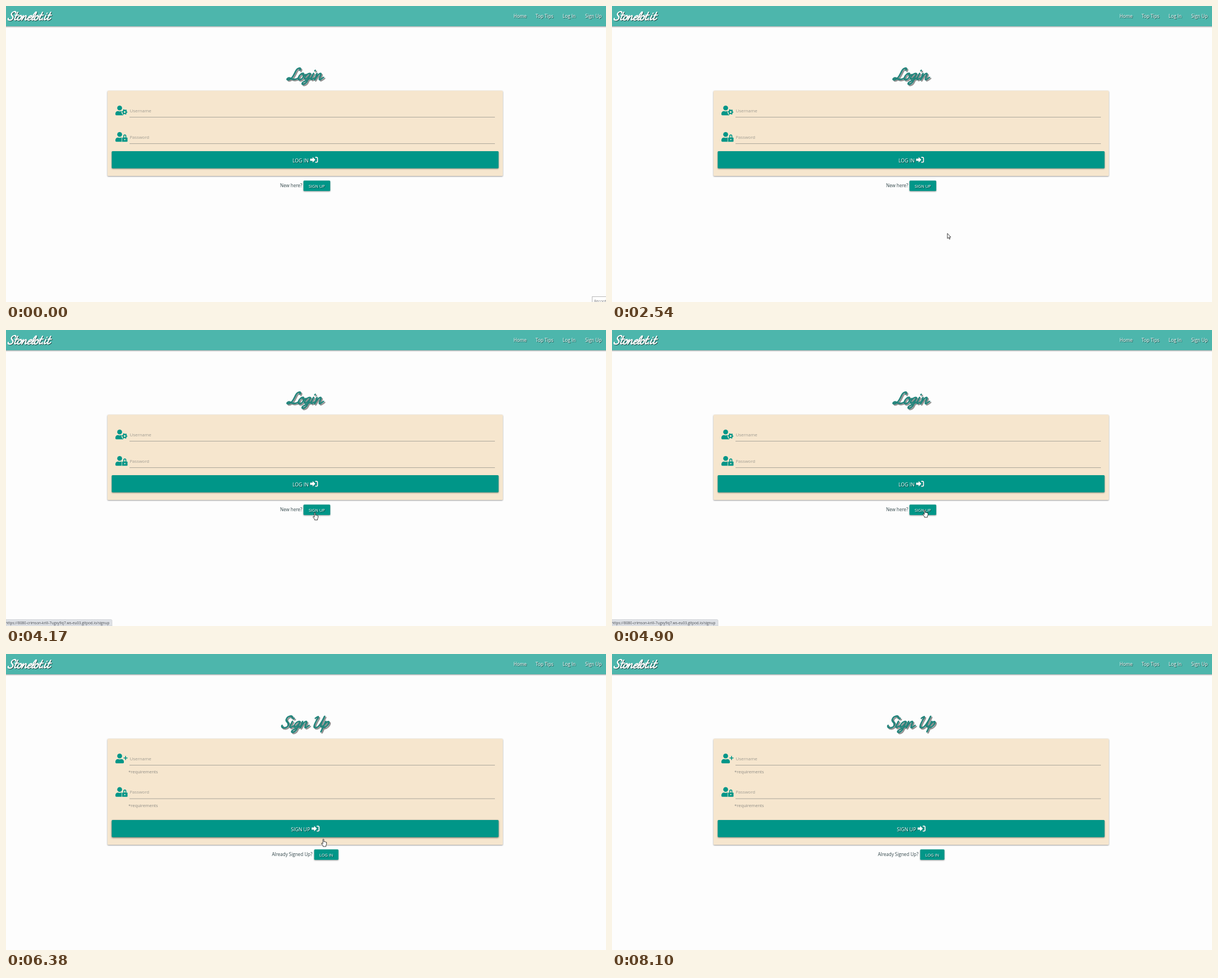
Write an HTML page that moves like this. It is 1064x526 px and loops after 8500 ms.

```html
<!DOCTYPE html>
<html lang="en">
<head>
<meta charset="utf-8">
<title>Login and sign up</title>
<style>
html, body { margin: 0; width: 100%; height: 100%; overflow: hidden; background: #fdfdfd; }
svg { display: block; font-family: "Open Sans", "Noto Sans", sans-serif; }
.teal { fill: #009688; }
.script { fill: none; stroke-linecap: round; stroke-linejoin: round; }
.lift { filter: drop-shadow(0 1px 1px rgba(0,0,0,.4)); }
.hover { filter: drop-shadow(0 1.5px 1.5px rgba(0,0,0,.55)); }
.glow { filter: drop-shadow(1px 1px .6px rgba(0,0,0,.6)); }
</style>
</head>
<body>
<svg id="stage" width="1064" height="526" viewBox="0 0 1064 526">
  <defs>
    <g id="user">
      <circle cx="224" cy="128" r="128"/>
      <path d="M314 288h-17c-46 21-100 21-146 0h-17C60 288 0 348 0 422v42c0 26 22 48 48 48h352c27 0 48-22 48-48v-42c0-74-60-134-134-134z"/>
    </g>
    <g id="cog">
      <circle cx="488" cy="336" r="172" fill="#f6e6ce"/>
      <circle cx="488" cy="336" r="124" fill="none" stroke="#009688" stroke-width="46" stroke-dasharray="65" stroke-dashoffset="32"/>
      <circle cx="488" cy="336" r="81" fill="none" stroke="#009688" stroke-width="66"/>
    </g>
    <g id="lock">
      <path d="M368 288v-80a128 128 0 0 1 256 0v80h40v224H328V288z" fill="#f6e6ce"/>
      <path d="M440 300v-92a56 56 0 0 1 112 0v92" fill="none" stroke="#009688" stroke-width="48"/>
      <rect x="352" y="288" width="288" height="224" rx="32"/>
      <circle cx="496" cy="400" r="34" fill="#f6e6ce"/>
    </g>
    <path id="plus" d="M512 128h48v80h80v48h-80v80h-48v-80h-80v-48h80z"/>
    <g id="enter" fill="#fff">
      <path d="M0 180h160V72l180 184-180 184V332H0z"/>
      <path d="M330 98h86q64 0 64 64v188q0 64-64 64h-86" fill="none" stroke="#fff" stroke-width="64"/>
    </g>
  </defs>
  <g id="login"></g>
  <g id="signup"></g>
  <g id="header"></g>
  <g id="status">
    <path d="M0 514.5H186q2 0 2 2V526H0z" fill="#dee1e6" stroke="#c4c7cc" stroke-width=".6"/>
    <text x="-1" y="522.7" font-size="6.45" fill="#4a4d52">https://8080-crimson-krill-7ugxy9q7.ws-eu03.gitpod.io/signup</text>
  </g>
  <g id="tip">
    <rect x="1039.5" y="516.5" width="30" height="15" fill="#fff" stroke="#b9b9b9"/>
    <text id="tipText" x="1043" y="527" font-size="6.6" fill="#777">Record</text>
  </g>
  <g id="cursor" fill="#fff" stroke="#111" stroke-width=".8" stroke-linejoin="round">
    <path id="arrow" d="M0 0V9L2 7.2 3.4 10.3 4.8 9.7 3.4 6.7H6.1z"/>
    <path id="hand" d="M-.9.8Q0-.6.9.8V5l1.3-.4.5.6 1.2-.2.5.7 1.2.1V9.4L4.6 11.6V13.4H-.6V12L-3.4 8.2Q-3.2 6.7-2 7.3L-.9 8.5z"/>
  </g>
</svg>
<script>
const $ = id => document.getElementById(id);

// Brush letters: advance width and pen path, baseline at 0
const glyphs = {
  L: [17, "M15-17C16-22 9-22 8-15C7-8 6-1 1 0C-4 0-3-4 1-3C6-2 10 2 17-3"],
  S: [15, "M14-17C13-23 4-21 4-15C4-10 12-10 11-4C10 2 0 1 0-4"],
  U: [18, "M0-17C3-20 5-21 4-16C2-8 1 0 6 0C11 0 14-10 15-20C13-8 12 1 18-3"],
  o: [11, "M6-11C2-12 0-8 0-4C0 2 8 1 8-5C8-9 6-11 4-10M8-7 11-9"],
  g: [12, "M8-10C4-13 0-8 0-4C0 1 6-1 8-10L6 4C5 9-1 9-1 6C-1 3 7 1 12-4"],
  i: [7, "M1-11 0-3C0 1 4-1 7-4M2-16v-.5"],
  n: [14, "M0-11V0C1-6 4-11 6-11C9-11 7-3 8-1C9 1 12-2 14-4"],
  p: [13, "M2-11 0 7M1-4C3-10 6-12 8-10C10-6 6 1 1-1"],
  t: [8, "M3-19 1-4C1 1 5 0 8-4M-1-12H7"],
  e: [9, "M1-5C10-7 7-13 3-10C-2-6 0 1 4 0C6 0 8-2 9-4"],
  l: [7, "M3-6C8-14 7-22 4-19C0-12 0 0 3 0C5 0 6-2 7-4"],
  ".": [5, "M1-1v.5"],
  " ": [7, ""]
};

function script(word, x, y, scale, color, shadow) {
  let pen = 0;
  const paths = [...word].map(c => {
    const [width, d] = glyphs[c];
    const path = `<path transform="translate(${pen})" d="${d}"/>`;
    pen += width;
    return path;
  }).join("");
  return `<g role="img" aria-label="${word}" style="filter:drop-shadow(${shadow})">
    <g class="script" stroke="${color}" stroke-width="3" transform="translate(${x} ${y}) scale(${scale}) skewX(-19)">${paths}</g></g>`;
}

const text = (s, x, y, size, fill, cls = "") =>
  `<text class="${cls}" x="${x}" y="${y}" font-size="${size}" fill="${fill}">${s}</text>`;

const icon = (id, x, y, scale, cls = "teal") =>
  `<use class="${cls}" href="#${id}" transform="translate(${x} ${y}) scale(${scale})"/>`;

const rect = (x, y, w, h, fill, id = "") =>
  `<rect id="${id}" class="lift" x="${x}" y="${y}" width="${w}" height="${h}" rx="1.5" fill="${fill}"/>`;

const field = (label, badge, y, size) =>
  icon("user", 194, y, .0336) + icon(badge, 194, y, .0336) +
  text(label, 219.5, y + 11.8, size, "#a09c92") +
  `<path d="M219 ${y + 20.6}H867" stroke="#aaa59a"/>`;

function page(p) {
  const b = p.button;
  return script(p.title, p.titleX, 131, 1, "#24857c", "2px 2px .7px rgba(0,0,0,.42)") +
    rect(180, 150.5, 701, b - 107 + .5, "#f6e6ce") +
    field("Username", p.badge, 177, 7.9) +
    field("Password", "lock", p.second, 7.65) +
    p.notes.map(y => text("*requirements", 217, y, 7.65, "#8f8c85")).join("") +
    rect(187.5, b, 686, 30.5, "#009688", p.id) +
    text(p.action, p.actionX, b + 20.4, 8.7, "#fff", "glow") +
    icon("enter", p.enterX, b + 8.3, .0273, "glow") +
    text(p.ask, p.askX, b + 63.6, 8.05, "#34484c") +
    rect(p.linkX, b + 52.3, p.linkW, 18.5, "#009688") +
    text(p.link, p.linkX + 9.2, b + 64.6, 7.4, "#fff", "glow");
}

$("login").innerHTML = page({
  title: "Login", titleX: 500.5, badge: "cog", second: 224, notes: [], button: 258, id: "loginButton",
  action: "LOG IN", actionX: 508, enterX: 539.3, ask: "New here?", askX: 486, link: "SIGN UP", linkX: 527.5, linkW: 47.5
}).replaceAll("<rect id=\"\"", "<rect");
$("signup").innerHTML = page({
  title: "Sign Up", titleX: 488, badge: "plus", second: 236.5, notes: [212.3, 271.8], button: 295, id: "signupButton",
  action: "SIGN UP", actionX: 505.3, enterX: 542, ask: "Already Signed Up?", askX: 471.5, link: "LOG IN", linkX: 546.5, linkW: 43
}).replaceAll("<rect id=\"\"", "<rect");
$("header").innerHTML =
  `<rect class="lift" x="-5" y="-5" width="1074" height="41" fill="#4db6ac"/>` +
  script("Stonelot.it", 3, 25, .73, "#fff", "1px 1px .7px rgba(0,0,0,.55)") +
  [["Home", 900], ["Top Tips", 939], ["Log In", 987], ["Sign Up", 1027]]
    .map(([s, x]) => text(s, x, 21.4, 8.2, "#fff", "glow")).join("");

// Pointer moves: start, end, steps, target x, target y
const moves = [
  [930, 1190, 5, 745, 434],
  [1790, 1791, 1, 748.7, 459.7],
  [1858, 2610, 12, 564, 393],
  [2670, 3020, 6, 529, 347],
  [3500, 3501, 1, 529.2, 345.7],
  [3568, 4310, 12, 554, 317],
  [4770, 4900, 3, 554.7, 319.5],
  [6380, 6381, 1, 562.8, 328.7],
  [6449, 7210, 12, 883, 446],
  [7280, 8100, 13, 1037, 530]
];

function pointer(t) {
  let x = 1064, y = 532;
  for (const [start, end, n, toX, toY] of moves) {
    if (t < start) break;
    const k = Math.min(1, (Math.floor((t - start) / (end - start) * (n - 1)) + 1) / n);
    x += (toX - x) * k;
    y += (toY - y) * k;
  }
  return [x, y];
}

const show = (id, on) => $(id).style.display = on ? "" : "none";
const fade = (id, value) => $(id).style.opacity = value;
const stepsDown = (t, start, end, n) =>
  t < start ? 1 : Math.max(0, 1 - (Math.floor((t - start) / (end - start) * (n - 1)) + 1) / n);

function draw(now) {
  const t = now % 8500, [x, y] = pointer(t), onLink = t >= 3970 && t < 6449;
  show("login", t < 5040);
  show("signup", t >= 5040);
  $("signupButton").setAttribute("class", t < 6449 ? "hover" : "lift");
  fade("tipText", stepsDown(t, 70, 130, 2));
  fade("tip", stepsDown(t, 530, 600, 2));
  fade("status", t < 4040 ? 0 : stepsDown(t, 5240, 5440, 4));
  show("cursor", t >= 930 && t < 8100);
  show("arrow", !onLink);
  show("hand", onLink);
  $("cursor").setAttribute("transform", `translate(${x} ${y})`);
  requestAnimationFrame(draw);
}
draw(0);
</script>
</body>
</html>
```
